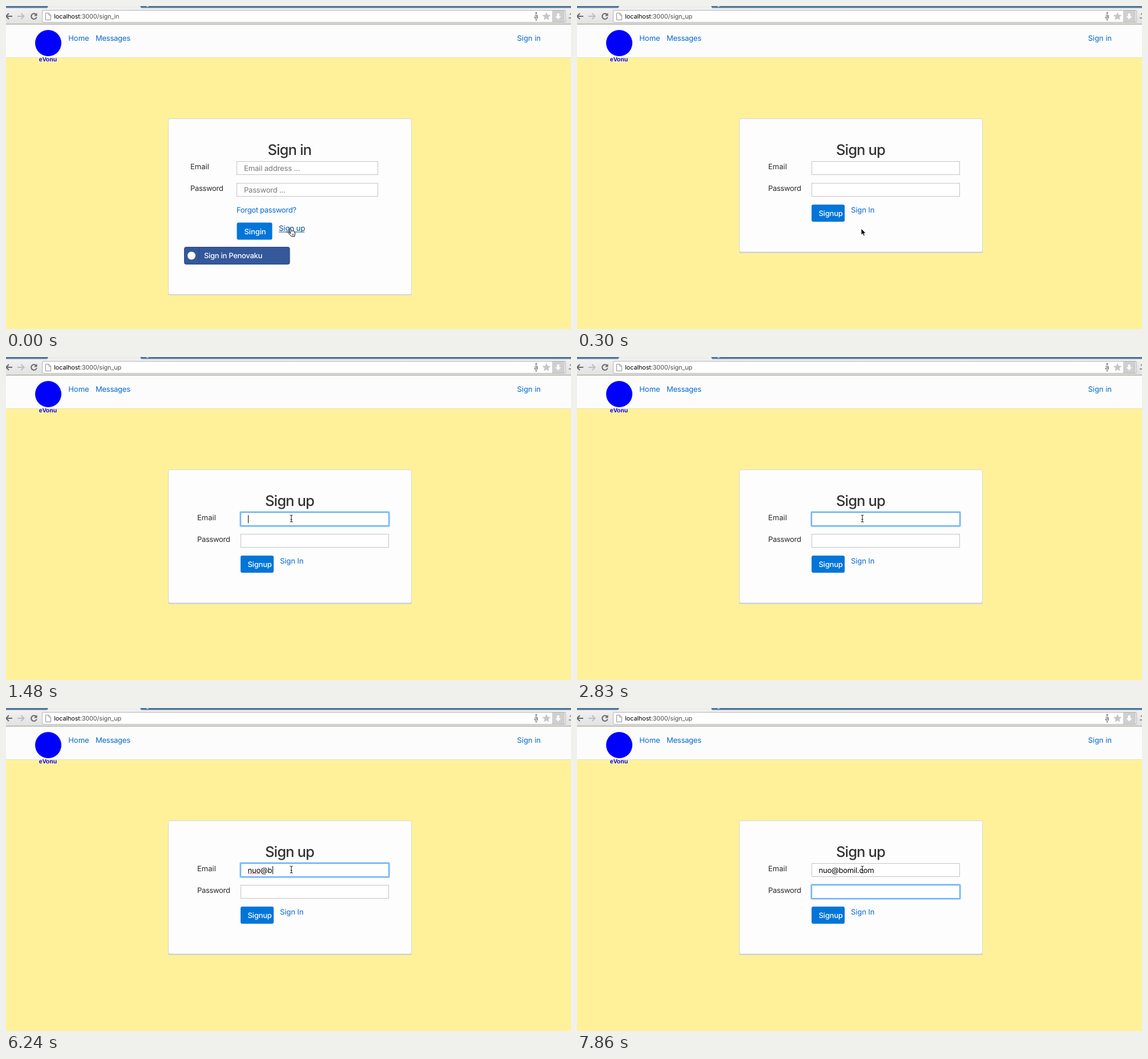
Write an HTML page that moves like this. It is 990 by 566 pixels and loops after 8000 ms.

```html
<!DOCTYPE html>
<html lang="en">
<head>
<meta charset="utf-8">
<title>Sign up</title>
<style>
  html, body { margin: 0; width: 100%; height: 100%; overflow: hidden; background: #fff199; }
  svg { display: block; width: 990px; height: 566px; font: 13px Inter, "Open Sans", sans-serif; text-rendering: geometricPrecision; }
  text { white-space: pre; fill: #292b2c; }
  .link { fill: #0568d0; }
  .title { font-size: 25.5px; font-weight: 500; letter-spacing: -.87px; fill: #333; }
  .url { font-size: 10.8px; letter-spacing: -.08px; fill: #4a4a4a; }
  .brand { font: bold 10.5px "Liberation Sans", Arial, sans-serif; fill: #00f; }
  .hint { fill: #777; }
  .label { font-weight: 500; fill: #fff; }
  .card { fill: #fdfdfd; stroke: #d6d6d6; }
  .field { fill: #fff; stroke: #c4c4c4; }
  .button { fill: #0275d8; }
  .ring { fill: none; stroke: #6cb2f7; }
  .hidden { display: none; }
</style>
</head>
<body>
<svg viewBox="0 0 990 566">
  <defs>
    <linearGradient id="bar" x2="0" y2="1">
      <stop stop-color="#f1f1f1"/><stop offset="1" stop-color="#e2e2e2"/>
    </linearGradient>
    <g id="glow" class="ring">
      <rect x="410.5" y="271.5" width="261" height="25" rx="1.5" stroke-width="3.6" opacity=".4"/>
      <rect x="411" y="272" width="260" height="24" rx="1" stroke-width="1.8"/>
    </g>
  </defs>

  <!-- browser toolbar -->
  <rect width="990" height="4" fill="#55789c"/>
  <path d="M72 4L74 0H235L237 4Z" fill="#ededed"/>
  <circle cx="248" cy="0" r="2" fill="#b9cbdc"/>
  <rect y="3.5" width="990" height="28" fill="url(#bar)"/>
  <rect y="31" width="990" height="1.6" fill="#a8a8a8"/>
  <g fill="none" stroke="#6a6a6a" stroke-width="2">
    <path d="M11 18H0M5 13L0 18L5 23"/>
    <path d="M20 18H31M26.500 13L31.500 18L26.500 23" stroke="#bdbdbd"/>
    <path d="M52.800 15.200A4.800 4.800 0 1 0 53.600 19.500"/>
  </g>
  <path d="M54.500 12V17.500H49Z" fill="#6a6a6a"/>
  <rect x="63.500" y="7.500" width="917" height="21" rx="1.5" fill="#fff" stroke="#b4b4b4"/>
  <path d="M69.500 12.500H75L78.500 16V24.500H69.500ZM75 12.500V16H78.500" fill="#fff" stroke="#8c8c8c"/>
  <text class="url" x="84.300" y="22"><tspan fill="#000">localhost</tspan>:3000/sign_<tspan id="path">in</tspan></text>
  <g fill="#777">
    <text x="925.300" y="22" font-size="12.5" font-weight="600" style="fill:#777">a</text>
    <circle cx="929" cy="12.200" r="1.500"/>
    <circle cx="929" cy="24.200" r="1.200"/>
  </g>
  <path d="M947 10.500L949.100 15.600L954.500 16L950.400 19.500L951.700 24.800L947 21.900L942.300 24.800L943.600 19.500L939.500 16L944.900 15.600Z" fill="#c6c6c6"/>
  <rect x="957" y="8" width="22" height="20" fill="#cfcfcf"/>
  <path d="M965.500 13H969.500V18H972.500L967.500 23.500L962.500 18H965.500Z" fill="#fff"/>
  <path d="M986 21H990M988 15L990 13" stroke="#777" stroke-width="1.500"/>

  <!-- site header -->
  <rect y="32.600" width="990" height="58" fill="#fcfcfc"/>
  <rect y="90" width="990" height="1" fill="#e6dfb6"/>
  <circle cx="74" cy="65" r="23" fill="#00f"/>
  <text class="brand" x="57.800" y="97">eVonu</text>
  <text class="link" x="109.200" y="61">Home</text>
  <text class="link" x="157" y="61" letter-spacing="-.25">Messages</text>
  <text class="link" x="895.400" y="61">Sign in</text>

  <g id="signin">
    <rect x="284" y="199" width="427" height="308" rx="3" fill="#d9d5bc"/>
    <rect class="card" x="284.500" y="197.500" width="426" height="308" rx="3"/>
    <text class="title" x="458.400" y="261">Sign in</text>
    <text x="323" y="286">Email</text>
    <text x="323" y="324" letter-spacing="-.33">Password</text>
    <rect class="field" x="404.500" y="272.500" width="247" height="23"/>
    <rect class="field" x="404.500" y="310.500" width="247" height="23"/>
    <text class="hint" x="417" y="289" letter-spacing="-.13">Email address ...</text>
    <text class="hint" x="417" y="327" letter-spacing="-.2">Password ...</text>
    <text class="link" x="404" y="362" letter-spacing="-.33">Forgot password?</text>
    <rect class="button" x="404.500" y="379.500" width="62" height="30" rx="3"/>
    <text class="label" x="417.500" y="399.500" letter-spacing="-.1">Singin</text>
    <text x="478" y="394" letter-spacing="-.05" style="fill:#014c8c">Sign up</text>
    <path d="M478 396H523" stroke="#014c8c"/>
    <rect x="312.500" y="422.500" width="184.500" height="30" rx="3" fill="#35589b" stroke="#2b4780"/>
    <path d="M338 423V452" stroke="#2d4a86"/>
    <circle cx="325" cy="437.500" r="7" fill="#fff"/>
    <text class="label" x="347" y="442" letter-spacing="-.3">Sign in Penovaku</text>
  </g>

  <g id="signup">
    <rect x="284" y="199" width="427" height="234" rx="3" fill="#d0d0cc"/>
    <rect class="card" x="284.500" y="197.500" width="426" height="233.500" rx="3"/>
    <text class="title" x="454" y="261">Sign up</text>
    <text x="335" y="286">Email</text>
    <text x="335" y="324" letter-spacing="-.33">Password</text>
    <rect class="field" x="411.500" y="272.500" width="259" height="23"/>
    <rect class="field" x="411.500" y="310.500" width="259" height="23"/>
    <use id="ring" href="#glow"/>
    <text id="typed" x="423.500" y="289" letter-spacing="-.2" style="fill:#000"></text>
    <path id="spell" d="M424.500 290H444.500" stroke="#e23b3b" stroke-width="1.600" stroke-dasharray="1.700 1.300"/>
    <rect id="caret" width="1" height="14"/>
    <rect class="button" x="411" y="348" width="58" height="30" rx="3"/>
    <text class="label" x="423.400" y="368" letter-spacing="-.2">Signup</text>
    <text class="link" x="480" y="362" letter-spacing="-.1">Sign In</text>
  </g>

  <!-- pointers, each with its hot spot at 0,0 -->
  <g id="hand" fill="#fff" stroke="#000" stroke-linejoin="round">
    <path d="M-.5 7.500L-2.300 1.200A1.100 1.100 0 0 1 -.2 .5L1.300 4.800A1 1 0 0 1 3.200 4.500A1 1 0 0 1 5 5A1 1 0 0 1 6.700 5.800L7.500 9L6.800 11.500V13.800H1.200L-3.800 8.600A1.100 1.100 0 0 1 -2.300 7.200L-.3 9Z"/>
    <path d="M2.500 9V12M4.500 9V12" stroke-width=".7"/>
  </g>
  <path id="arrow" d="M0 0V11.200L2.600 8.800L4.400 12.900L6.300 12.100L4.600 8.200H8Z" fill="#000" stroke="#fff" stroke-width=".8"/>
  <path id="beam" d="M-2.500 -6Q0 -6 0 -4.500Q0 -6 2.500 -6M0 -4.500V4.500M-2.500 6Q0 6 0 4.500Q0 6 2.500 6M-1.500 1.500H1.500" fill="none" stroke="#222" stroke-width="1.100"/>
</svg>
<script>
  const LOOP = 8000;
  const $ = id => document.getElementById(id);
  const show = (id, on) => $(id).classList.toggle('hidden', !on);

  const start = {
    path: 'in', page: 'signin', pointer: 'hand', x: 499, y: 390,
    focus: 0, field: 0, text: '', caret: 0, spell: 0
  };
  const type = (text, caret = 1) => ({ text, caret });
  const blink = caret => ({ caret });
  const move = (pointer, x, y) => ({ pointer, x, y });

  // Each step changes only the listed properties.
  const steps = [
    [150, { path: 'up', ...move('arrow', 498, 390) }],
    [300, { page: 'signup' }],
    [600, move('arrow', 507, 372)],
    [750, move('beam', 513, 318)],
    [890, move('beam', 506, 260)],
    [1040, move('beam', 500, 283)],
    [1330, { focus: .55 }],
    [1480, { focus: 1, caret: 1 }],
    [1780, blink(0)],
    [2380, blink(1)],
    [2830, blink(0)],
    [3130, type('nu')],
    [3270, type('nuo')],
    [3870, blink(0)],
    [4170, type('nu')],
    [4320, type('')],
    [4460, type('n')],
    [4610, type('nu')],
    [4910, type('nuo')],
    [5510, blink(0)],
    [5650, type('nuo@')],
    [5950, { spell: 1 }],
    [6100, blink(0)],
    [6240, type('nuo@b')],
    [6390, type('nuo@bo')],
    [6530, type('nuo@bom')],
    [6680, type('nuo@bomi')],
    [6820, type('nuo@bomil.')],
    [6970, type('nuo@bomil.c')],
    [7110, type('nuo@bomil.com')],
    [7410, { field: 1, caret: 1, spell: 0 }],
    [7860, blink(0)]
  ];

  function draw(t) {
    const s = { ...start };
    for (const [at, change] of steps) if (t >= at) Object.assign(s, change);

    $('path').textContent = s.path;
    for (const id of ['signin', 'signup']) show(id, id === s.page);
    for (const id of ['hand', 'arrow', 'beam']) show(id, id === s.pointer);
    $(s.pointer).setAttribute('transform', `translate(${s.x} ${s.y})`);

    const drop = s.field * 38;
    $('ring').setAttribute('opacity', s.focus);
    $('ring').setAttribute('y', drop);
    $('typed').textContent = s.text;
    show('spell', s.spell);
    show('caret', s.caret);
    if (s.caret) {
      const width = s.field || !s.text ? 0 : $('typed').getComputedTextLength();
      $('caret').setAttribute('x', Math.round(424 + width));
      $('caret').setAttribute('y', 277 + drop);
    }
  }

  const begin = performance.now();
  function tick() {
    draw((performance.now() - begin) % LOOP);
    requestAnimationFrame(tick);
  }
  tick();
</script>
</body>
</html>
```
